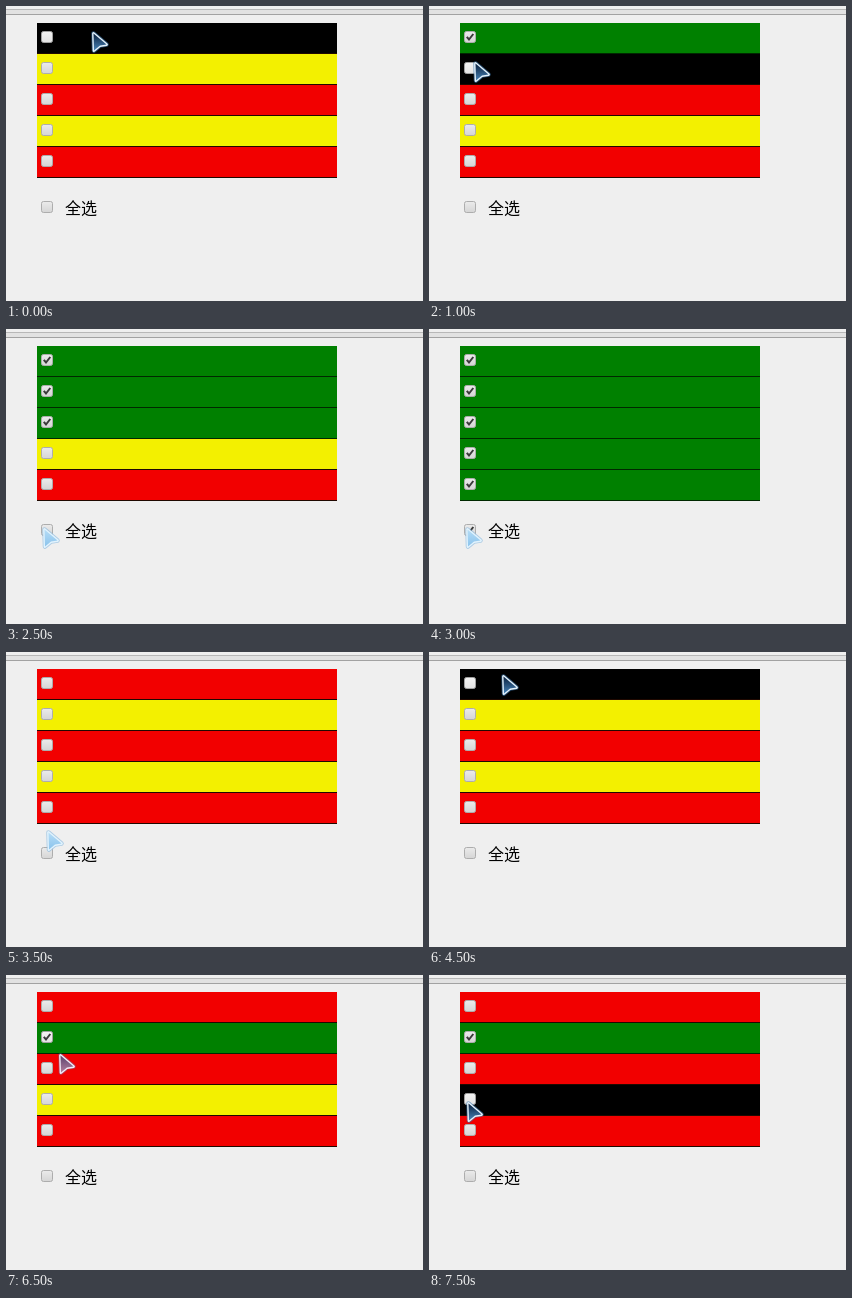
Recreate the animation shown at these times as an HTML page with a canvas. Size 417x295 px, loop 8 s.

```html
<!DOCTYPE html>
<html lang="zh-CN">
<head>
<meta charset="utf-8">
<title>全选</title>
<style>
  html, body { margin: 0; width: 100%; height: 100%; overflow: hidden; background: #efefef; }
  canvas { position: absolute; left: 0; top: 0; width: 417px; height: 295px; }
  span {
    position: absolute; left: 59px; top: 193px;
    font: 16px/16px "Noto Sans CJK SC", "Noto Sans CJK", sans-serif;
    color: #000; white-space: nowrap;
  }
</style>
</head>
<body>
<canvas id="stage" width="417" height="295"></canvas>
<span>全选</span>
<script>
const ctx = document.getElementById('stage').getContext('2d');
const LOOP = 8000;
const ROWS = 5, ROW_X = 31, ROW_Y = 17, ROW_W = 300, ROW_H = 30, PITCH = 31;
const SELECT_ALL = 5;

// Pointer tones: glow, outline, fill top, fill bottom.
const TONES = {
  navy: ['rgba(60,120,175,.6)', '#e4f2fc', '#0c2340', '#4580b4'],
  sky: ['rgba(130,180,220,.6)', '#e2f3fd', '#b4dcf6', '#8cc4ec'],
  plum: ['rgba(120,110,160,.5)', '#f0ecf8', '#5c4470', '#b07c9c']
};

// Each step holds until the next one starts; hover -1 means no row.
const step = (at, x, y, tone, hover, ...checked) => ({ at, x, y, tone, hover, checked });
const STEPS = [
  step(0, 85, 25, 'navy', 0),
  step(500, 42, 29, 'navy', 0),
  step(1000, 44, 55, 'navy', 1, 0),
  step(1500, 41, 85, 'navy', 2, 0, 1),
  step(2000, 37, 105, 'sky', 2, 0, 1, 2),
  step(2500, 36, 198, 'sky', -1, 0, 1, 2),
  step(3000, 36, 198, 'sky', -1, 0, 1, 2, 3, 4, SELECT_ALL),
  step(3500, 40, 178, 'sky', -1),
  step(4500, 72, 22, 'navy', 0),
  step(5000, 72, 156, 'navy', 4),
  step(5500, 77, 17, 'navy', 0),
  step(6000, 42, 61, 'navy', 1),
  step(6500, 52, 78, 'plum', 1, 1),
  step(7000, 37, 126, 'plum', 3, 1),
  step(7500, 37, 126, 'navy', 3, 1)
];

function rect(color, x, y, w, h) {
  ctx.fillStyle = color;
  ctx.fillRect(x, y, w, h);
}

function gradient(y0, y1, top, bottom) {
  const g = ctx.createLinearGradient(0, y0, 0, y1);
  g.addColorStop(0, top);
  g.addColorStop(1, bottom);
  return g;
}

function trace(points, closed) {
  ctx.beginPath();
  points.forEach(([x, y]) => ctx.lineTo(x, y));
  if (closed) ctx.closePath();
}

function stroke(color, width) {
  ctx.strokeStyle = color;
  ctx.lineWidth = width;
  ctx.stroke();
}

function drawCheckbox(x, y, checked, hover) {
  ctx.save();
  ctx.translate(x, y);
  ctx.beginPath();
  ctx.roundRect(0.5, 0.5, 11, 11, 2);
  ctx.fillStyle = hover ? gradient(0, 12, '#f4f4f4', '#e2e2e2') : gradient(0, 12, '#ececec', '#d4d4d4');
  ctx.fill();
  stroke(hover ? '#a0a0a0' : '#adadad', 1);
  if (checked) {
    trace([[2.8, 5.8], [5, 8.5], [9.3, 3]]);
    stroke('#3a3a3a', 2);
  }
  ctx.restore();
}

function drawRow(i, hover, checked) {
  const y = ROW_Y + i * PITCH;
  const base = i % 2 ? '#f3f000' : '#f20000';
  rect(checked ? '#008000' : hover ? '#000' : base, ROW_X, y, ROW_W, ROW_H);
  rect(checked ? '#002800' : '#200800', ROW_X, y + ROW_H, ROW_W, 1);
  drawCheckbox(35, y + 8, checked, hover);
}

function drawPointer(x, y, tone) {
  const [glow, outline, top, bottom] = TONES[tone];
  ctx.save();
  ctx.translate(x, y);
  ctx.lineJoin = 'round';
  trace([[2.5, 2.5], [15.5, 13.5], [9, 14.5], [3, 19.5]], true);
  stroke(glow, 4.5);
  stroke(outline, 2.8);
  ctx.fillStyle = gradient(3, 19, top, bottom);
  ctx.fill();
  ctx.restore();
}

function drawPage() {
  rect('#efefef', 0, 0, 417, 295);
  rect('#b8b8b8', 0, 3, 417, 1);
  rect('#e2e2e2', 0, 4, 417, 4);
  rect('#a2a2a2', 0, 8, 417, 1);
}

function draw(time) {
  const t = time % LOOP;
  const s = STEPS.findLast(({ at }) => at <= t);
  drawPage();
  for (let i = 0; i < ROWS; i++) drawRow(i, s.hover === i, s.checked.includes(i));
  drawCheckbox(35, 195, s.checked.includes(SELECT_ALL), false);
  drawPointer(s.x, s.y, s.tone);
}

const start = performance.now();
function tick() {
  draw(performance.now() - start);
  requestAnimationFrame(tick);
}
tick();
</script>
</body>
</html>
```
